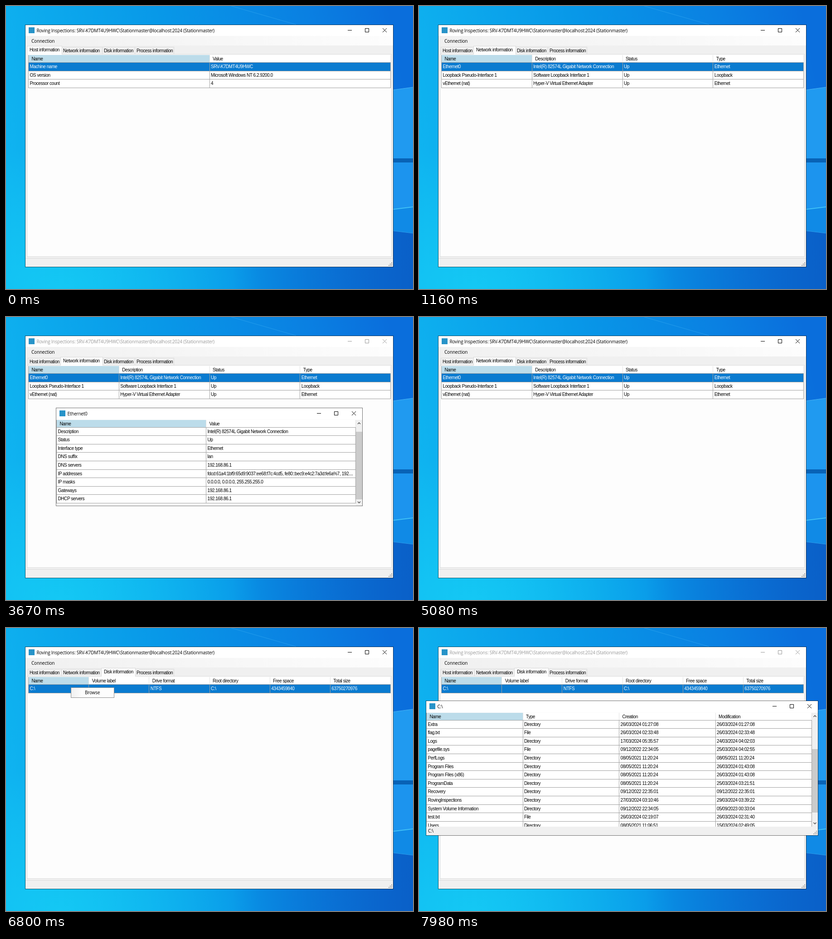
An HTML page that plays this animation: 898x624 px, repeating every 8 s.

```html
<!DOCTYPE html>
<html lang="en">
<head>
<meta charset="utf-8">
<title>Network and disk browser</title>
<style>
html, body { margin: 0; width: 100%; height: 100%; overflow: hidden; }
#stage { position: relative; width: 898px; height: 624px; overflow: hidden;
  font: 10px/18px "Liberation Sans", Arial, sans-serif; letter-spacing: -.43px; color: #000; }
#stage div, #stage svg { position: absolute; box-sizing: border-box; white-space: pre; }
.ui { font-family: "Open Sans", "Noto Sans", sans-serif; letter-spacing: -.2px; }

/* windows */
.win { background: #fdfdfd padding-box; border: 1px solid rgba(0, 0, 0, .55); }
.title { left: 0; right: 0; top: 0; height: 24px; line-height: 24px; background: #fff; }
.title .icon { left: 7px; top: 5px; width: 13px; height: 13px; background: #2793c8; }
.title .name { left: 24.5px; top: 0; }
.caption { right: 0; top: 0; fill: none; stroke: currentColor; }
.caption .hit { fill: transparent; stroke: none; }
.status { left: 0; right: 0; background: #f0f0f0; }
.grip { right: 1px; bottom: 1px; fill: #a5a5a5; }

/* tables */
.head, .row { left: 0; width: 100%; display: flex; border: 1px solid #a0a0a0; border-width: 0 0 1px 1px; }
.head { top: 0; height: 17px; line-height: 18px; background: #fff; }
#stage .head div, #stage .row div { position: static; flex: 1 1 0; min-width: 0; height: 100%; overflow: hidden; }
.head div { padding-left: 6.5px; border-right: 1px solid #e2e2e2; }
.head div:first-child { background: #bcdcea; }
.row { background: #fff; }
.row div { padding-left: 2.5px; border-right: 1px solid #a0a0a0; }
.row.sel { background: #0a7bd0; color: #fff; }
.view { left: 0; right: 0; top: 17px; bottom: 0; overflow: hidden; }
.rows { left: 0; right: 0; top: 0; }
.bar { background: #f0f0f0; }
.bar svg { left: 0; top: 0; }
.thumb { left: 0; right: 0; top: 14px; background: #cbcbcb; }

/* main window */
#menu { left: 0; right: 0; top: 24px; height: 21px; line-height: 22px; padding-left: 13px;
  background: linear-gradient(90deg, #f0f0f0, #fdfdfd); }
#strip { left: 0; right: 0; top: 45px; bottom: 0; background: #f0f0f0; }
#page { left: 3px; top: 64px; width: 805px; height: 447px; background: #fdfdfd; border: 1px solid #dcdcdc; }
.tab { top: 48px; height: 17px; line-height: 16px; padding-left: 3px; background: #f0f0f0; border: 1px solid #dadada; }
.tab.on { top: 46px; height: 19px; padding-left: 5px; background: #fdfdfd; border-bottom: 0; }
.panel { inset: 0; }
#context { left: 143px; top: 131px; width: 96px; height: 23px; border: 1px solid #8c8c8c;
  background: linear-gradient(90deg, #f0f0f0, #fcfcfc 22px, #fdfdfd 23px); line-height: 21px; }
#item { left: 1px; right: 1px; top: 1px; bottom: 1px; border: 1px solid transparent; padding-left: 28px; line-height: 17px; }

/* timeline: 8 s, 1% = 80 ms */
.panel { animation: 8s step-end infinite; }
#main .title { animation: 8s step-end infinite focus; }
#host { animation-name: host; }
#net { animation-name: net; }
#disk { animation-name: disk; }
#context { animation: 8s step-end infinite context; }
#item { animation: 8s step-end infinite item; }
#tab1 { animation: 8s linear infinite hover1; }
#tab2 { animation: 8s linear infinite hover2; }
#info { animation: 8s ease-out infinite info; }
#files { animation: 8s ease-out infinite files; }
#info .rows, #info .thumb { animation: 8s step-end infinite scroll1; }
#files .rows, #files .thumb { animation: 8s step-end infinite scroll2; }
#info .rows { --b: -19px; }
#info .thumb { --b: 12px; }
#files .rows { --a: -56px; --b: -112px; }
#files .thumb { --a: 33px; --b: 66px; }
#info .min { animation: 8s step-end infinite min; }
#info .max { animation: 8s step-end infinite max; }
#info .close { animation: 8s linear infinite close; }
#info .x { animation: 8s linear infinite cross; }

@keyframes focus { 0%, 62.125% { color: #000; } 33.875%, 91.125%, 100% { color: #999; } }
@keyframes host { 0% { visibility: visible; } 13.25%, 100% { visibility: hidden; } }
@keyframes net { 0%, 72.5%, 100% { visibility: hidden; } 13.25% { visibility: visible; } }
@keyframes disk { 0% { visibility: hidden; } 72.5%, 100% { visibility: visible; } }
@keyframes context { 0%, 91.125%, 100% { visibility: hidden; } 85% { visibility: visible; } }
@keyframes item {
  0%, 91.125%, 100% { background: transparent; border-color: transparent; }
  86.125% { background: #b3d7f3; border-color: #0078d7; }
}
@keyframes hover1 { 0%, 9.5%, 13.3%, 100% { background: #f0f0f0; } 10.5%, 13.25% { background: #d8eaf9; } }
@keyframes hover2 { 0%, 68.3%, 72.55%, 100% { background: #f0f0f0; } 69.5%, 72.5% { background: #d8eaf9; } }
@keyframes info {
  0%, 33.5%, 63.5%, 100% { opacity: 0; transform: scale(.93); }
  35.875%, 62% { opacity: 1; transform: none; }
}
@keyframes files {
  0%, 90.875% { opacity: 0; transform: scale(.93); }
  92.75%, 100% { opacity: 1; transform: none; }
}
@keyframes scroll1 { 0% { transform: none; } 45.875%, 100% { transform: translateY(var(--b)); } }
@keyframes scroll2 {
  0% { transform: none; }
  95.25% { transform: translateY(var(--a)); }
  99.75%, 100% { transform: translateY(var(--b)); }
}
@keyframes min { 0%, 52.875%, 100% { fill: transparent; } 52.125% { fill: #e5e5e5; } }
@keyframes max { 0%, 53.625%, 100% { fill: transparent; } 52.875% { fill: #e5e5e5; } }
@keyframes close { 0%, 53.6%, 100% { fill: #e8112300; } 55.5%, 64% { fill: #e81123; } }
@keyframes cross { 0%, 53.6%, 100% { stroke: #000; } 55.5%, 64% { stroke: #fff; } }
</style>
</head>
<body>
<div id="stage">
  <svg width="898" height="624">
    <defs>
      <linearGradient id="sky" x1="0" y1=".55" x2="1" y2=".4">
        <stop offset="0" stop-color="#0fb4f0"/><stop offset=".45" stop-color="#0898e8"/>
        <stop offset=".8" stop-color="#0a80e2"/><stop offset="1" stop-color="#0a6edc"/>
      </linearGradient>
      <radialGradient id="glow" cx=".13" cy="1" r=".5">
        <stop offset="0" stop-color="#14c8f4"/><stop offset="1" stop-color="#14c8f4" stop-opacity="0"/>
      </radialGradient>
      <linearGradient id="shade">
        <stop offset="0" stop-color="#0a60c8" stop-opacity="0"/><stop offset="1" stop-color="#0a60c8"/>
      </linearGradient>
    </defs>
    <path fill="url(#sky)" d="M0 0h898v624H0z"/>
    <path fill="url(#glow)" d="M0 0h898v624H0z"/>
    <path stroke="#3fb0f2" opacity=".5" d="M497 0L640 41"/>
    <path fill="#209af0" d="M840 187L898 179V336H840z"/>
    <path stroke="#4ab4f4" d="M840 187L898 179"/>
    <path fill="#0862b6" d="M840 336h58v9h-58z"/>
    <path fill="#1c94ee" d="M840 345h58v98l-58 7z"/>
    <path fill="#108ae6" d="M840 450l58-7v58l-58-7z"/>
    <path stroke="#3fc0f6" stroke-width="2" d="M840 450l58-7"/>
    <path fill="url(#shade)" d="M500 494h340l58 7V624H500z"/>
    <path stroke="#2c9cea" d="M840 494l58 7"/>
  </svg>
</div>
<script>
const ROW = 18.6;
const box = (x, y, w, h) => `style="left:${x}px;top:${y}px;width:${w}px;height:${h}px"`;
const cells = list => list.map(text => `<div>${text}</div>`).join('');

function table(x, y, w, h, heads, rows) {
  const body = rows.map((row, i) => {
    const top = Math.round(i * ROW), next = Math.round((i + 1) * ROW);
    return `<div class="row ${i ? '' : 'sel'}" style="top:${top}px;height:${next - top}px">${cells(row)}</div>`;
  }).join('');
  return `<div ${box(x, y, w, h)}><div class="head">${cells(heads)}</div>
    <div class="view"><div class="rows">${body}</div></div></div>`;
}

function bar(x, y, w, h, thumb) {
  const mid = w / 2;
  return `<div class="bar" ${box(x, y, w, h)}><div class="thumb" style="height:${thumb}px"></div>
    <svg width="${w}" height="${h}" fill="none" stroke="#505050" stroke-width="1.5">
    <path d="M${mid - 3} 9l3-3 3 3M${mid - 3} ${h - 9}l3 3 3-3"/></svg></div>`;
}

function grip() {
  let dots = '';
  for (let r = 0; r < 3; r++)
    for (let c = 2 - r; c < 3; c++) dots += `<path d="M${c * 3} ${r * 3}h2v2h-2z"/>`;
  return `<svg class="grip" width="9" height="9">${dots}</svg>`;
}

const status = (top, h, text = '') =>
  `<div class="status" style="top:${top}px;height:${h}px;padding-left:4px;line-height:${h}px">${text}${grip()}</div>`;

function win(id, x, y, w, h, name, content) {
  return `<div class="win" id="${id}" ${box(x, y, w, h)}>
    <div class="title ui"><div class="icon"></div><div class="name">${name}</div>
    <svg class="caption" width="116" height="25">
      <path class="hit min" d="M0 0h38.5v25H0z"/><path class="hit max" d="M38.5 0H77v25H38.5z"/>
      <path class="hit close" d="M77 0h39v25H77z"/>
      <path d="M16 11.5h9M54.5 7.5h8v8h-8z"/><path class="x" d="M93 7l9 9M102 7l-9 9"/>
    </svg></div>${content}</div>`;
}

const tabs = [
  ['Host information', 5, 75], ['Network information', 79, 91],
  ['Disk information', 169, 73], ['Process information', 241, 87]
];
const tab = ([text, x, w], i) =>
  `<div class="tab" id="tab${i}" style="left:${x}px;width:${w}px">${text}</div>`;

function panel(id, i, heads, rows) {
  const [text, x, w] = tabs[i];
  return `<div class="panel" id="${id}">
    <div class="tab on" style="left:${x - 2}px;width:${w + 3}px">${text}</div>
    ${table(6, 66, 800, 440, heads, rows)}</div>`;
}

const host = 'SRV-K7DMT4U9HWC', user = 'Stationmaster';
const card = 'Intel(R) 82574L Gigabit Network Connection', gateway = '192.168.86.1';

const main = win('main', 42, 41, 813, 535, `Roving Inspections: ${host}\\${user}@localhost:2024 (${user})`, `
  <div id="menu" class="ui">Connection</div>
  <div id="strip"></div>${tabs.map(tab).join('')}<div id="page"></div>
  ${panel('host', 0, ['Name', 'Value'], [
    ['Machine name', host], ['OS version', 'Microsoft Windows NT 6.2.9200.0'], ['Processor count', '4']])}
  ${panel('net', 1, ['Name', 'Description', 'Status', 'Type'], [
    ['Ethernet0', card, 'Up', 'Ethernet'],
    ['Loopback Pseudo-Interface 1', 'Software Loopback Interface 1', 'Up', 'Loopback'],
    ['vEthernet (nat)', 'Hyper-V Virtual Ethernet Adapter', 'Up', 'Ethernet']])}
  ${panel('disk', 2, ['Name', 'Volume label', 'Drive format', 'Root directory', 'Free space', 'Total size'], [
    ['C:\\', '', 'NTFS', 'C:\\', '4343459840', '63750270976']])}
  <div style="left:0;right:0;top:514px;height:1px;background:#dcdcdc"></div>
  ${status(515, 18)}`);

const info = win('info', 110, 200, 677, 217, 'Ethernet0',
  table(0, 26, 661, 189, ['Name', 'Value'], [
    ['Name', 'Ethernet0'], ['Description', card], ['Status', 'Up'], ['Interface type', 'Ethernet'],
    ['DNS suffix', 'lan'], ['DNS servers', gateway],
    ['IP addresses', 'fdcd:61a4:1bf9:65d9:9037:ee68:f7c:4cd5, fe80::bec9:e4c2:7a3d:fe6a%7, 192....'],
    ['IP masks', '0.0.0.0, 0.0.0.0, 255.255.255.0'], ['Gateways', gateway], ['DHCP servers', gateway]
  ]) + bar(661, 26, 14, 189, 149));

const setup = '08/05/2021 11:20:24', first = '09/12/2022 22:34:05';
const entries = [
  ['$Recycle.Bin', setup, '26/03/2024 01:20:11'],
  ['$WinREAgent', first, first],
  ['Config.Msi', '26/03/2024 01:27:08', '26/03/2024 01:43:08'],
  ['Documents and Settings', first, first],
  ['DumpStack.log', first, first],
  ['DumpStack.log.tmp', first, '25/03/2024 04:02:55'],
  ['Extra', '26/03/2024 01:27:08', '26/03/2024 01:27:08'],
  ['flag.txt', '26/03/2024 02:33:48', '26/03/2024 02:33:48'],
  ['Logs', '17/03/2024 05:35:57', '24/03/2024 04:02:03'],
  ['pagefile.sys', first, '25/03/2024 04:02:55'],
  ['PerfLogs', setup, setup],
  ['Program Files', setup, '26/03/2024 01:43:08'],
  ['Program Files (x86)', setup, '26/03/2024 01:43:08'],
  ['ProgramData', setup, '25/03/2024 03:21:51'],
  ['Recovery', '09/12/2022 22:35:01', '09/12/2022 22:35:01'],
  ['RovingInspections', '27/03/2024 03:10:46', '29/03/2024 03:39:22'],
  ['System Volume Information', first, '05/09/2023 00:33:04'],
  ['test.txt', '26/03/2024 02:19:07', '26/03/2024 02:31:40'],
  ['Users', '08/05/2021 11:06:51', '15/03/2024 02:49:05']
].map(([name, ...dates]) => [name, /\.(txt|sys|log|tmp)$/.test(name) ? 'File' : 'Directory', ...dates]);

const files = win('files', 15, 160, 866, 298, 'C:\\',
  table(0, 26, 851, 251, ['Name', 'Type', 'Creation', 'Modification'], entries)
  + bar(851, 26, 13, 251, 140) + status(277, 19, '<span class="ui">C:\\</span>'));

const context = '<div id="context" class="ui"><div id="item">Browse</div></div>';
document.getElementById('stage').insertAdjacentHTML('beforeend', main + info + context + files);
</script>
</body>
</html>
```
